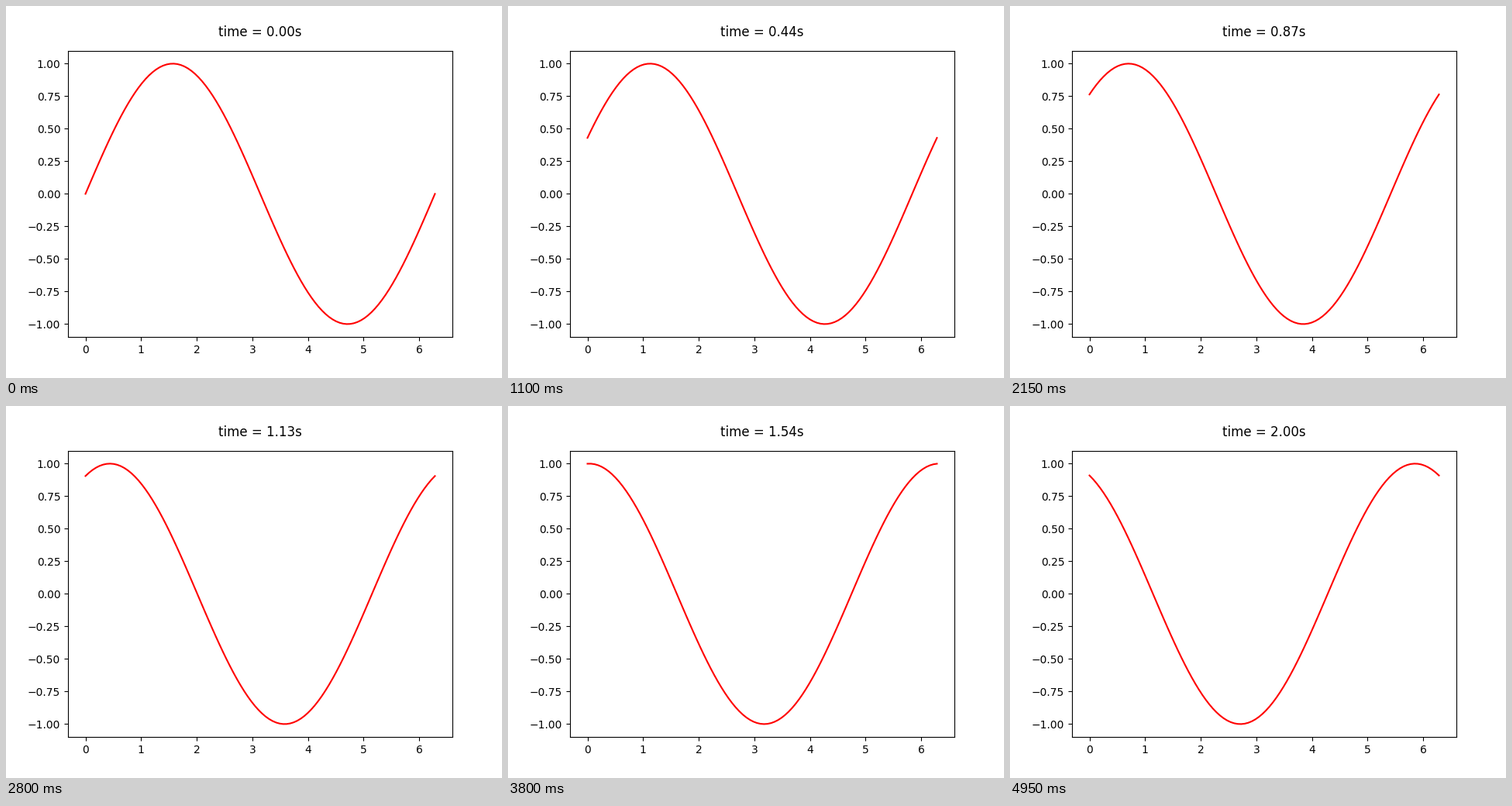
A matplotlib script for the animation above (5 s loop, 640 px wide and 480 px high).

```python
import numpy as np
import matplotlib.pyplot as plt
from matplotlib.animation import FuncAnimation

FRAMES = 100
INTERVAL = 50  # ms

times = np.linspace(0, 2, FRAMES)
x = np.linspace(0, 2 * np.pi, 100)

plt.rcParams["font.family"] = "DejaVu Sans"
fig, ax = plt.subplots(figsize=(6.4, 4.8), dpi=100)
line, = ax.plot(x, np.sin(x), color="red", linewidth=1.5)
label = ax.text(0.5, 1.05, "", transform=ax.transAxes, ha="center", fontsize=12)


def update(frame):
    t = times[frame]
    line.set_ydata(np.sin(x + t))
    label.set_text(f"time = {t:.2f}s")
    return line, label


anim = FuncAnimation(fig, update, frames=FRAMES, interval=INTERVAL,
                     repeat=True, repeat_delay=0, blit=False)
plt.show()
```
